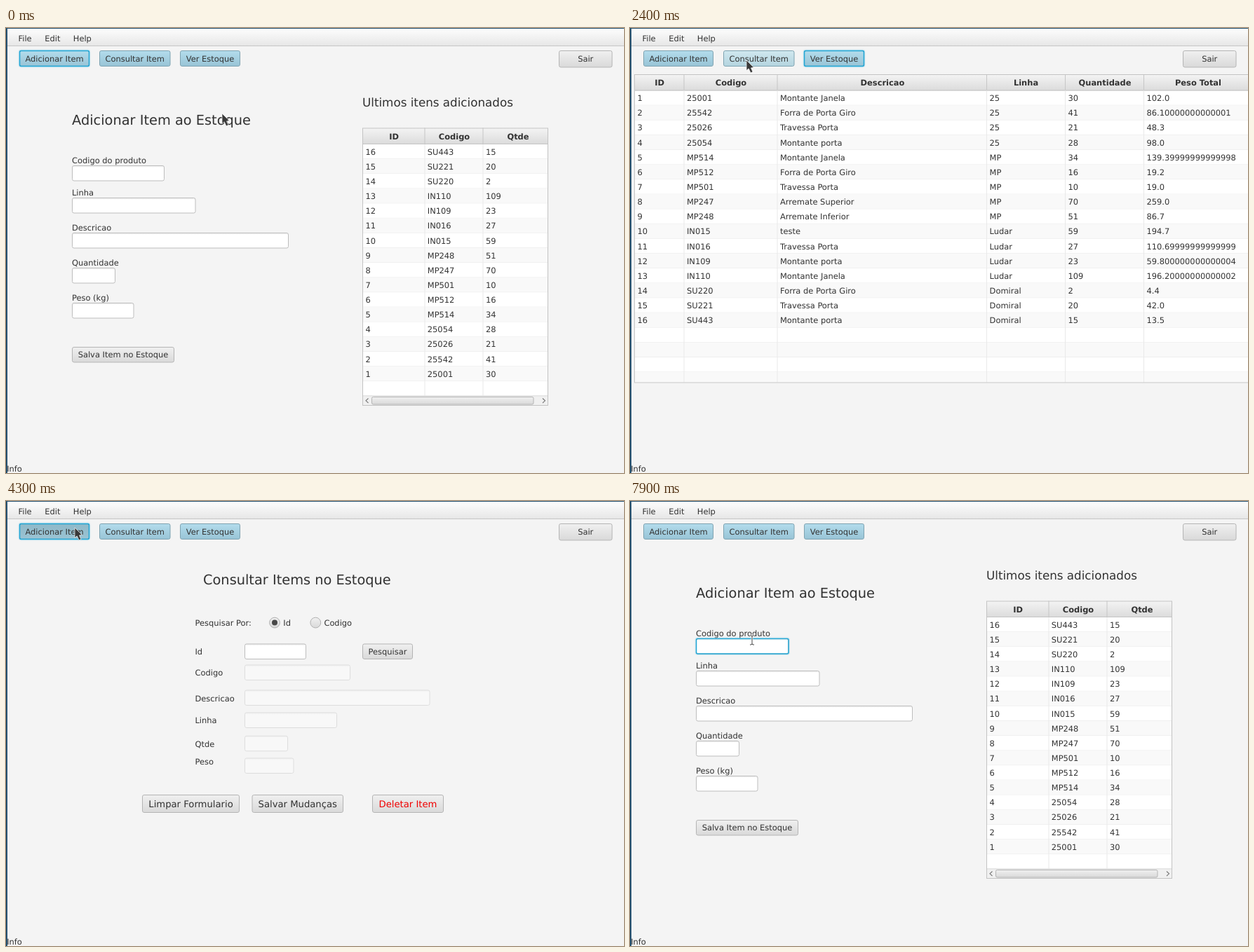
Animation of 881 by 635 pixels, one loop 8 s. Source, as an HTML page:

```html
<!DOCTYPE html>
<html lang="pt">
<head>
<meta charset="utf-8">
<title>Estoque</title>
<style>
html, body { margin: 0; width: 100%; height: 100%; overflow: hidden; background: #f4f4f4; }
svg { display: block; width: 881px; height: 635px; }
text { font: 11.45px "DejaVu Sans", sans-serif; fill: #323232; text-rendering: geometricPrecision; }
.mid { text-anchor: middle; }
.bold { font-weight: bold; }
</style>
</head>
<body>
<svg id="stage" viewBox="0 0 881 635">
  <defs id="defs"></defs>
  <g id="frame"></g>
  <g id="add"></g>
  <g id="list"></g>
  <g id="find"></g>
  <g id="bar"></g>
  <g id="caretBox"></g>
  <g id="pointer">
    <path d="M0 0V14.6L3.2 11.9L6 17.9L9 16.6L6.5 11L10.4 10.3Z" fill="#393939" stroke="#fff" stroke-opacity=".75" stroke-width=".9"/>
  </g>
  <g id="ibeam" fill="none">
    <path d="M-3 -6.5H-1L0 -5.5L1 -6.5H3M0 -5.5V5.5M-3 6.5H-1L0 5.5L1 6.5H3" stroke="#fff" stroke-width="2.6"/>
    <path d="M-3 -6.5H-1L0 -5.5L1 -6.5H3M0 -5.5V5.5M-3 6.5H-1L0 5.5L1 6.5H3" stroke="#444" stroke-width="1"/>
  </g>
</svg>
<script>
const LOOP = 8000, ROW = 21.14;
const $ = id => document.getElementById(id);

function make(parent, tag, attrs, content) {
  const el = document.createElementNS('http://www.w3.org/2000/svg', tag);
  for (const key in attrs) el.setAttribute(key, attrs[key]);
  if (content !== undefined) el.textContent = content;
  parent.appendChild(el);
  return el;
}

function gradient(id, ...colors) {
  const g = make($('defs'), 'linearGradient', { id, x1: 0, y1: 0, x2: 0, y2: 1 });
  colors.forEach((c, i) => make(g, 'stop', { offset: i / (colors.length - 1), 'stop-color': c }));
}

const rect = (p, x, y, width, height, fill, more) =>
  make(p, 'rect', { x, y, width, height, fill, ...more });

function text(p, x, y, str, cls = '', size = 0, color = '') {
  const el = make(p, 'text', { x, y, class: cls }, str);
  if (size) el.style.fontSize = size + 'px';
  if (color) el.style.fill = color;
  return el;
}

function ring(p, x, y, w, h) {
  const g = make(p, 'g', { fill: 'none' });
  rect(g, x - .8, y - .8, w + 1.6, h + 1.6, 'none', { rx: 3.2, stroke: '#039ed3', 'stroke-opacity': .16, 'stroke-width': 1.2 });
  rect(g, x + .5, y + .5, w - 1, h - 1, 'none', { rx: 2, stroke: '#1fa5d4', 'stroke-width': 1.5 });
  return g;
}

function button(p, x, y, w, h, label, opts = {}) {
  const { fill = 'gray', border = '#b4b4b4', size = 11.45, color = '' } = opts;
  rect(p, x + .5, y + 1.3, w - 1, h - .8, '#fff', { rx: 2.6, opacity: .7 });
  const body = rect(p, x + .5, y + .5, w - 1, h - 1, `url(#${fill})`, { rx: 2.4, stroke: border });
  const focus = ring(p, x, y, w, h);
  focus.style.display = 'none';
  text(p, x + w / 2, y + h / 2 + size * .365, label, 'mid', size, color);
  return { x, y, w, h, body, focus };
}

function field(p, x, y, w, disabled) {
  const g = make(p, 'g', { opacity: disabled ? .4 : 1 });
  rect(g, x + .5, y + .5, w - 1, 21.5, 'url(#input)', { rx: 2.4, stroke: '#bdbdbd' });
}

// cols: [left edge, right edge, header centre, title, cell text x]
function table(p, box, headH, cols, rows) {
  const [x, y, w, h, bodyH] = box;
  const top = y + 1 + headH, bottom = top + bodyH;
  rect(p, x, y, w, h, '#fff');
  for (let i = 0; top + i * ROW < bottom; i++) {
    const ry = top + i * ROW, rh = Math.min(ROW, bottom - ry);
    rect(p, x, ry, w, rh, i % 2 ? '#f9f9f9' : '#fff');
    if (rh === ROW) rect(p, x, ry + ROW - .9, w, .9, '#efefef');
  }
  rect(p, x, y, w, headH + 1, 'url(#head)');
  rect(p, x, top - 1, w, 1, '#c4c4c4');
  for (const [, right, mid, title] of cols) {
    if (right < x + w - 1) {
      rect(p, right - .5, top, 1, bodyH, '#e9e9e9');
      rect(p, right - .5, y, 1, headH, '#c6c6c6');
    }
    text(p, mid, y + headH / 2 + 5.2, title, 'mid bold');
  }
  rows.forEach((cells, r) => cells.forEach((cell, c) =>
    text(p, cols[c][4], top + (r + .5) * ROW + 4.1, cell)));
  rect(p, x + .5, y + .5, w - 1, h - 1, 'none', { stroke: '#c3c3c3' });
}

gradient('menu', '#fdfdfd', '#e6e6e6');
gradient('head', '#f4f4f4', '#dbdbdb');
gradient('gray', '#f0f0f0', '#d9d9d9');
gradient('blue', '#b3dcec', '#98c4d6');
gradient('blueHover', '#d0e8ef', '#b4d4df');
gradient('bluePress', '#8fb9c9', '#9ac3d3');
make($('defs'), 'linearGradient', { id: 'input', x1: 0, y1: 0, x2: 0, y2: 1 }).innerHTML =
  '<stop offset="0" stop-color="#ebebeb"/><stop offset=".14" stop-color="#fff"/>';

// Window chrome
const frame = $('frame');
rect(frame, 0, 0, 881, 635, '#f4f4f4');
rect(frame, 0, 1, 881, 25, 'url(#menu)');
rect(frame, 0, 25, 881, 1, '#c6c6c6');
rect(frame, 0, 0, 881, 1, '#24506f');
rect(frame, 0, 0, 2, 635, '#24506f');
[['File', 17.5], ['Edit', 55.3], ['Help', 95.8]].forEach(([s, x]) => text(frame, x, 18.6, s));
text(frame, 1.2, 632.6, 'Info');

const blue = { fill: 'blue', border: '#7fa3b1' };
const tabs = [[19, 100, 'Adicionar Item'], [133, 101.5, 'Consultar Item'], [248, 86, 'Ver Estoque']]
  .map(([x, w, s]) => button($('bar'), x, 32, w, 23, s, blue));
button($('bar'), 788, 32, 76.5, 24.5, 'Sair');

const stock = `25001|Montante Janela|25|30|102.0
25542|Forra de Porta Giro|25|41|86.10000000000001
25026|Travessa Porta|25|21|48.3
25054|Montante porta|25|28|98.0
MP514|Montante Janela|MP|34|139.39999999999998
MP512|Forra de Porta Giro|MP|16|19.2
MP501|Travessa Porta|MP|10|19.0
MP247|Arremate Superior|MP|70|259.0
MP248|Arremate Inferior|MP|51|86.7
IN015|teste|Ludar|59|194.7
IN016|Travessa Porta|Ludar|27|110.69999999999999
IN109|Montante porta|Ludar|23|59.800000000000004
IN110|Montante Janela|Ludar|109|196.20000000000002
SU220|Forra de Porta Giro|Domiral|2|4.4
SU221|Travessa Porta|Domiral|20|42.0
SU443|Montante porta|Domiral|15|13.5`.split('\n').map((line, i) => [i + 1, ...line.split('|')]);

// Add view
const add = $('add');
text(add, 94, 138, 'Adicionar Item ao Estoque', '', 19.38);
text(add, 508, 112, 'Ultimos itens adicionados', '', 16.74);
[['Codigo do produto', 196, 132], ['Linha', 242, 176.5], ['Descricao', 292, 309],
 ['Quantidade', 342, 62], ['Peso (kg)', 392, 88.5]].forEach(([s, y, w]) => {
  text(add, 94, y - 3, s);
  field(add, 94, y, w);
});
button(add, 94, 455, 146, 22.5, 'Salva Item no Estoque');
table(add, [508, 142.5, 265, 396.5, 359.4], 22.5,
  [[508, 597, 553, 'ID', 512.6], [597, 680, 639, 'Codigo', 600.8], [680, 780, 730, 'Qtde', 684]],
  stock.map(r => [r[0], r[1], r[4]]).reverse());
rect(add, 509, 525, 263, 13, '#f0f0f0');
rect(add, 509, 524.5, 263, .8, '#d4d4d4');
rect(add, 521.5, 526.5, 230.5, 10.5, 'url(#gray)', { rx: 2, stroke: '#b4b4b4' });
make(add, 'path', { d: 'M516.5 528.5L513 531.8L516.5 535M765 528.5L768.5 531.8L765 535', fill: 'none', stroke: '#777', 'stroke-width': 1.1 });

// Stock view
table($('list'), [6, 66, 890, 440.5, 416], 22.5,
  [[6, 77, 42, 'ID', 10.4], [77, 210, 144, 'Codigo', 81], [210, 508.5, 360, 'Descricao', 214],
   [508.5, 620.5, 564.5, 'Linha', 512.6], [620.5, 732.5, 677, 'Quantidade', 624.5],
   [732.5, 896, 810, 'Peso Total', 736.5]], stock);

// Search view
const find = $('find');
text(find, 281, 119.4, 'Consultar Items no Estoque', '', 19.38);
text(find, 269.5, 178, 'Pesquisar Por:');
[[383, 'Id', 395.3], [441.3, 'Codigo', 453.4]].forEach(([cx, s, x], i) => {
  make(find, 'circle', { cx, cy: 173.6, r: 7.4, fill: 'url(#gray)', stroke: '#b0b0b0' });
  if (!i) make(find, 'circle', { cx, cy: 173.6, r: 4, fill: '#484848' });
  text(find, x, 178, s);
});
[['Id', 203.5, 88, 219.4], ['Codigo', 233.5, 151, 249.4], ['Descricao', 269.5, 264.5, 285.6], ['Linha', 301.5, 132, 317.4],
 ['Qtde', 334.8, 62, 350.7], ['Peso', 366.5, 70.5, 375.6]].forEach(([s, y, w, base], i) => {
  text(find, 269.5, base, s);
  field(find, 340, y, w, i > 0);
});
button(find, 508, 203.5, 72, 22.5, 'Pesquisar');
button(find, 194, 419, 139, 26, 'Limpar Formulario', { size: 13.2 });
button(find, 350.5, 419, 130.5, 26, 'Salvar Mudanças', { size: 13.2 });
button(find, 522, 419, 102, 26, 'Deletar Item', { size: 13.2, color: '#f00000' });

const inputFocus = ring($('caretBox'), 94, 196, 132.5, 22.5);
const caret = rect($('caretBox'), 101.6, 200.5, 1, 13, '#333');

// [first step, last step, x, y], one step per 100 ms
const moves = [[600, 1200, 285, 40], [1900, 1900, 190, 52], [2100, 2200, 104, 52], [2300, 2400, 166, 46],
  [3000, 3000, 179, 42], [3700, 4100, 98, 38], [4600, 4800, 169, 193.5]];
const presses = [[1700, 1800], [3000, 3300], [4300, 4400]];
const blinks = [5600, 5800, 6300, 6700, 7300, 7900];

function pointerAt(t) {
  let x = 308, y = 122;
  for (const [from, to, tx, ty] of moves) {
    if (t < from) break;
    const k = Math.min(1, (Math.floor((t - from) / 100) + 1) / ((to - from) / 100 + 1));
    const e = k * k * (3 - 2 * k);
    x += (tx - x) * e;
    y += (ty - y) * e;
  }
  return [x, y];
}

// Value of the last [time, value] pair already reached
const at = (t, pairs) => pairs.filter(p => t >= p[0]).pop()[1];
const show = (el, on) => { el.style.display = on ? '' : 'none'; };

function draw(t) {
  const view = at(t, [[0, 'add'], [1800, 'list'], [3300, 'find'], [4400, 'add']]);
  const focus = at(t, [[0, 0], [1700, 2], [3000, 1], [4300, 0], [5000, -1]]);
  const [x, y] = pointerAt(t);
  const down = presses.some(([a, b]) => t >= a && t < b);
  const typing = t >= 5000;

  for (const id of ['add', 'list', 'find']) show($(id), id === view);
  tabs.forEach((b, i) => {
    const over = x >= b.x && x <= b.x + b.w && y >= b.y && y <= b.y + b.h;
    b.body.setAttribute('fill', `url(#${over ? (down ? 'bluePress' : 'blueHover') : 'blue'})`);
    show(b.focus, i === focus);
  });

  show(inputFocus, typing);
  show(caret, blinks.filter(b => t >= b).length % 2);
  show($('pointer'), !typing);
  show($('ibeam'), typing);
  $('pointer').setAttribute('transform', `translate(${x} ${y})`);
  $('ibeam').setAttribute('transform', t < 5600 ? 'translate(174 200)' : 'translate(174 198.5)');
}

function tick() {
  draw(performance.now() % LOOP);
  requestAnimationFrame(tick);
}
tick();
</script>
</body>
</html>
```
